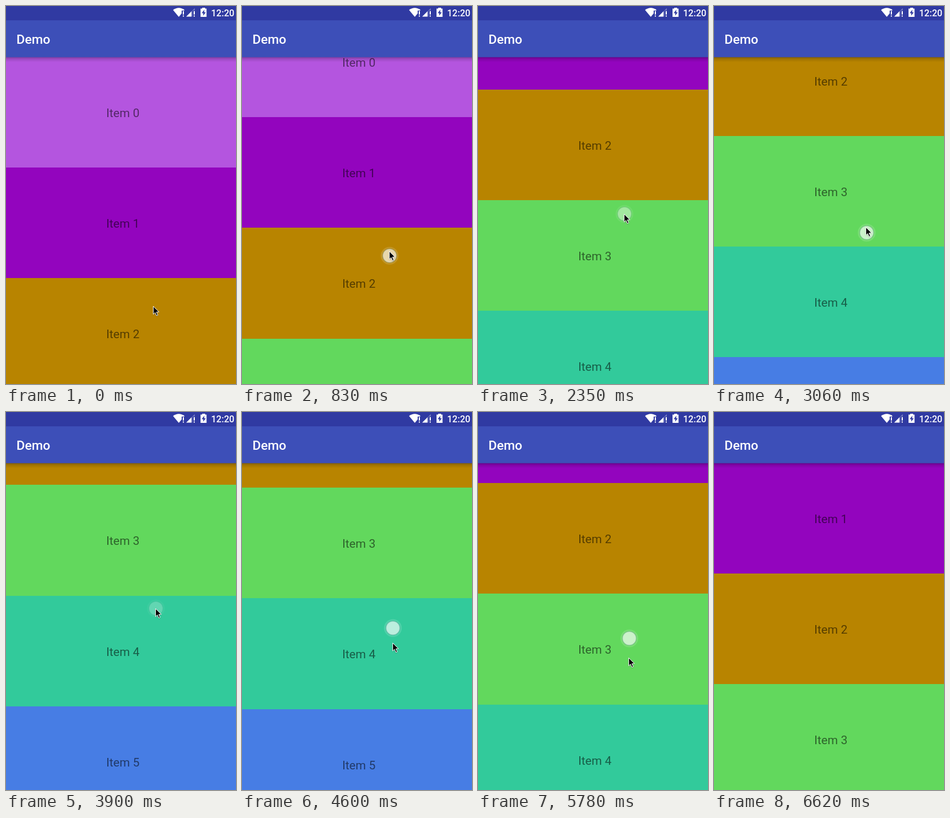
These frames come from a looping animation (402x660 px, 7.91 s). An HTML page with a canvas:

```html
<!DOCTYPE html>
<html lang="en">
<head>
<meta charset="utf-8">
<title>Snapping list</title>
<style>
html, body { margin: 0; width: 100%; height: 100%; overflow: hidden; }
canvas { display: block; }
</style>
</head>
<body>
<canvas id="stage" width="402" height="660"></canvas>
<script>
const ctx = document.getElementById('stage').getContext('2d');
const LOOP = 7910, STEP = 118, LEAD = 10;
const LIST_TOP = 89, PITCH = 193.2;
const COLORS = ['#b455df', '#9305be', '#b88400', '#62d85d', '#32ca9b', '#477de4'];
const STATUS = '#303aa2';

// Each drag goes between two points, then the list settles on an item.
const DRAGS = [
  { down: 520, up: 860, from: [257, 524], to: [257, 427], item: 1 },
  { down: 1800, up: 2208, from: [257, 467], to: [255, 363], item: 2 },
  { down: 2700, up: 3689, from: [271, 451], to: [261, 343], item: 3 },
  { down: 4440, up: 4882, from: [262, 334], to: [264, 450], item: 2 },
  { down: 5650, up: 6110, from: [264, 360], to: [262, 500], item: 1 }
];
const TRAVEL = 350, SETTLE = 410, FADE = 200;
const TOUCH_LAG = 70, CURSOR_GONE = 6480;

const progress = (t, start, end) => Math.min(1, Math.max(0, (t - start) / (end - start)));
const decelerate = p => 1 - (1 - p) ** 2;
const smooth = p => p * p * (3 - 2 * p);
const mix = (a, b, p) => a + (b - a) * p;

const lastDrag = t => DRAGS.findLastIndex(d => t >= d.down);

// During a drag the pointer slows down; just before the next one it travels to its start.
function pointerAt(t) {
  const i = lastDrag(t), drag = DRAGS[i], next = DRAGS[i + 1];
  if (!drag) return next.from;
  const dragged = decelerate(progress(t, drag.down, drag.up));
  const travelled = next ? smooth(progress(t, next.down - TRAVEL, next.down)) : 0;
  return [0, 1].map(k => mix(mix(drag.from[k], drag.to[k], dragged), next ? next.from[k] : 0, travelled));
}

function scrollAt(t) {
  const i = lastDrag(t), drag = DRAGS[i];
  if (!drag) return 0;
  const base = i ? DRAGS[i - 1].item * PITCH : 0;
  const y = pointerAt(Math.min(t, drag.up))[1];
  const settled = decelerate(progress(t, drag.up, drag.up + SETTLE));
  return mix(base + drag.from[1] - y, drag.item * PITCH, settled);
}

function polygon(points, color) {
  ctx.beginPath();
  points.forEach(([x, y]) => ctx.lineTo(x, y));
  ctx.closePath();
  ctx.fillStyle = color;
  ctx.fill();
}

function rect(x, y, w, h, color) {
  ctx.fillStyle = color;
  ctx.fillRect(x, y, w, h);
}

function label(text, x, y, font, color) {
  ctx.font = font + ' Roboto, sans-serif';
  ctx.fillStyle = color;
  ctx.fillText(text, x, y);
}

function disc(x, y, r, color) {
  ctx.beginPath();
  ctx.arc(x, y, r, 0, 2 * Math.PI);
  ctx.fillStyle = color;
  ctx.fill();
}

function drawList(scroll) {
  COLORS.forEach((color, i) => {
    const top = Math.round(LIST_TOP + i * PITCH - scroll);
    rect(0, top, 402, PITCH + 1, color);
    label('Item ' + i, 175.2, top + 105, '20.6px', 'rgba(0,0,0,.54)');
  });
  const shadow = ctx.createLinearGradient(0, LIST_TOP, 0, LIST_TOP + 9);
  shadow.addColorStop(0, 'rgba(0,0,0,.3)');
  shadow.addColorStop(.4, 'rgba(0,0,0,.13)');
  shadow.addColorStop(1, 'rgba(0,0,0,0)');
  rect(0, LIST_TOP, 402, 9, shadow);
}

function exclamation(x) {
  rect(x, 9, 2, 6, '#fff');
  rect(x, 16.5, 2, 2, '#fff');
}

function drawBars() {
  rect(0, 0, 402, 25, STATUS);
  rect(0, 25, 402, 64.4, '#3d4fb8');
  label('Demo', 18.2, 66, '500 22.5px', '#fff');
  label('12:20', 358.5, 17.5, '500 16px', '#fff');

  // wifi
  ctx.beginPath();
  ctx.moveTo(302, 19);
  ctx.lineTo(292, 7);
  ctx.quadraticCurveTo(302, -.5, 312, 7);
  ctx.fillStyle = '#fff';
  ctx.fill();
  rect(307, 8, 6, 12, STATUS);
  exclamation(309);

  // cell signal
  polygon([[315, 18.5], [330, 18.5], [330, 3.5]], 'rgba(255,255,255,.3)');
  polygon([[315, 18.5], [324, 18.5], [324, 9.5]], '#fff');
  rect(326, 8, 5, 11, STATUS);
  exclamation(328);

  // battery
  rect(343, 3, 5, 3, '#fff');
  rect(340, 4.5, 10.5, 14.5, '#fff');
  polygon([[346.5, 6.5], [342, 12.5], [344.7, 12.5], [344.7, 17], [349, 11], [346.5, 11]], STATUS);
}

function drawTouch(t) {
  const drag = DRAGS[lastDrag(t)];
  if (!drag || t >= drag.up + FADE) return;
  const [x, y] = pointerAt(Math.min(t, drag.up));
  ctx.globalAlpha = 1 - progress(t, drag.up, drag.up + FADE);
  disc(x + 1, y, 15.5, 'rgba(255,255,255,.14)');
  disc(x + 1, y, 12, 'rgba(255,255,255,.62)');
  ctx.strokeStyle = 'rgba(80,130,130,.3)';
  ctx.lineWidth = 1.5;
  ctx.stroke();
  ctx.globalAlpha = 1;
}

function drawCursor(t) {
  if (t >= CURSOR_GONE) return;
  const [x, y] = pointerAt(t).map(Math.round);
  ctx.save();
  ctx.translate(x + .4, y + .2);
  ctx.shadowColor = 'rgba(0,0,0,.35)';
  ctx.shadowBlur = 2;
  ctx.shadowOffsetY = 1;
  polygon([[0, 0], [0, 14], [3.2, 11], [5.6, 16.5], [8, 15.5], [5.6, 10.2], [10, 10]], '#000');
  ctx.shadowColor = 'transparent';
  ctx.strokeStyle = '#fff';
  ctx.lineWidth = 1;
  ctx.stroke();
  ctx.restore();
}

function draw(now) {
  // the picture advances in fixed ticks
  const t = Math.floor((now % LOOP + LEAD) / STEP) * STEP;
  const touchTime = t - TOUCH_LAG;
  drawList(scrollAt(touchTime));
  drawBars();
  drawTouch(touchTime);
  drawCursor(t);
}

const start = performance.now();
function frame() {
  draw(performance.now() - start);
  requestAnimationFrame(frame);
}
frame();
</script>
</body>
</html>
```
